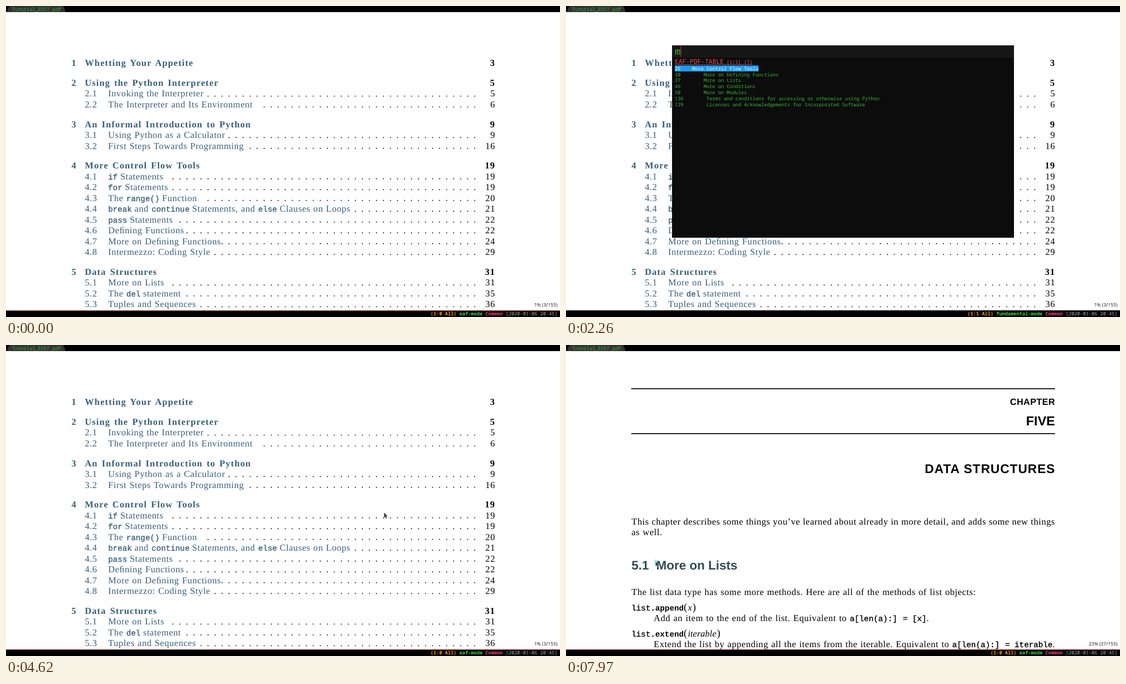
An HTML page with a canvas that plays this animation: 998x561 px, repeating every 8 s.

```html
<!DOCTYPE html>
<html lang="en">
<head>
<meta charset="utf-8">
<title>PDF viewer with fuzzy table of contents</title>
<style>
html, body { margin: 0; width: 100%; height: 100%; overflow: hidden; background: #000; }
canvas { display: block; }
</style>
</head>
<body>
<canvas id="stage" width="998" height="561"></canvas>
<script>
const W = 998, H = 561, LOOP = 8000;
const ctx = document.getElementById('stage').getContext('2d');
ctx.textRendering = 'geometricPrecision';

const LINK = '#355f7c', GREEN = '#3ab53a', RED = '#f84a4a', DARK = '#0c0c0c';
const PAGE_TOP = 11, PAGE_END = 549;
const LEFT = 117.5, DOT_STEP = 12.64, LAST_DOT = 57;

const style = (font, letter = 0, word = 0, stroke = 0) => ({ font, letter, word, stroke });
const serif = style('16.5px "Liberation Serif", serif', 0.55, 0.7);
const bold = style('bold 16.5px "Liberation Serif", serif', 1.1, 1.9);
const italic = style('italic 16.5px "Liberation Serif", serif');
const paren = style('19px "Liberation Serif", serif');
const code = style('14.25px "Liberation Mono", monospace', 0, 0, 0.35);
const codeBold = style('bold 14.25px "Liberation Mono", monospace');
const label = style('8.5px "Noto Sans", sans-serif');
const sans = (size, letter = 0) => style(`bold ${size}px "Liberation Sans", sans-serif`, letter);
const mono = (size, weight = '') => style(`${weight} ${size}px "Noto Sans Mono", monospace`);
const CELL = 5.2, ui = mono(CELL / 0.6), uiBold = mono(CELL / 0.6, 'bold');
const uiHead = mono(11.3), uiInput = mono(CELL / 0.3);

function use(s, extra = 0) {
  ctx.font = s.font;
  ctx.letterSpacing = s.letter + 'px';
  ctx.wordSpacing = s.word + extra + 'px';
}

// Draws one run and returns the x where it ends.
function put(str, x, y, s, color, align = 'left', extra = 0) {
  use(s, extra);
  ctx.textAlign = align;
  ctx.fillStyle = color;
  ctx.fillText(str, x, y);
  if (s.stroke) {
    ctx.strokeStyle = color;
    ctx.lineWidth = s.stroke;
    ctx.strokeText(str, x, y);
  }
  return x + ctx.measureText(str).width;
}

// Text with `code` parts; a right edge makes it justified.
function rich(str, x, y, color, right) {
  const runs = str.split('`').map((part, i) => i % 2 ? [part, code] : [part.replace(/fi/g, '\ufb01'), serif]);
  let extra = 0;
  if (right) {
    let width = 0;
    for (const [part, s] of runs) { use(s); width += ctx.measureText(part).width; }
    extra = (right - x - width) / (str.split(' ').length - 1);
  }
  for (const [part, s] of runs) if (part) x = put(part, x, y, s, color, 'left', extra);
}

function box(x, y, w, h, color) {
  ctx.fillStyle = color;
  ctx.fillRect(x, y, w, h);
}

function disc(x, y, r, color) {
  ctx.fillStyle = color;
  ctx.beginPath();
  ctx.arc(x, y, r, 0, 7);
  ctx.fill();
}

function shape(points, color) {
  ctx.fillStyle = color;
  ctx.beginPath();
  points.forEach(([x, y]) => ctx.lineTo(x, y));
  ctx.closePath();
  ctx.fill();
}

// chapter: title, page, entries; entry: title, page, number of leader dots
const contents = [
  ['Whetting Your Appetite', 3],
  ['Using the Python Interpreter', 5,
    ['Invoking the Interpreter', 5, 39],
    ['The Interpreter and Its Environment', 6, 31]],
  ['An Informal Introduction to Python', 9,
    ['Using Python as a Calculator', 9, 36],
    ['First Steps Towards Programming', 16, 33]],
  ['More Control Flow Tools', 19,
    ['`if` Statements', 19, 44],
    ['`for` Statements', 19, 44],
    ['The `range()` Function', 20, 39],
    ['`break` and `continue` Statements, and `else` Clauses on Loops', 21, 18],
    ['`pass` Statements', 22, 43],
    ['Defining Functions', 22, 42],
    ['More on Defining Functions', 24, 37],
    ['Intermezzo: Coding Style', 29, 38]],
  ['Data Structures', 31,
    ['More on Lists', 31, 44],
    ['The `del` statement', 35, 42],
    ['Tuples and Sequences', 36, 40]]
];

function drawContents() {
  let y = 108.3;
  contents.forEach(([title, page, ...entries], i) => {
    put(i + 1, 118, y, bold, LINK);
    put(title, 142, y, bold, LINK);
    put(page, 881.4, y, bold, '#000', 'right');
    entries.forEach(([name, at, dots], j) => {
      y += 19.5;
      put(`${i + 1}.${j + 1}`, 142, y, serif, LINK);
      rich(name, 184, y, LINK);
      for (let k = 0; k < dots; k++) {
        disc(LEFT + (LAST_DOT - k + 0.5) * DOT_STEP, y - 0.8, 0.95, '#000');
      }
      put(at, 881.2, y, serif, '#000', 'right');
    });
    y += 35.6;
  });
}

function signature(name, arg, y) {
  let x = put('list.', 118, y, code, '#000');
  x = put(name, x, y, codeBold, '#000');
  x = put('(', x, y, paren, '#000');
  x = put(arg, x + 1, y, italic, '#000');
  put(')', x + 1, y, paren, '#000');
}

function drawChapter() {
  const ink = '#000';
  box(LEFT, 78, 763.5, 1.7, ink);
  box(LEFT, 159, 763.5, 1.7, ink);
  put('CHAPTER', 881, 108, sans(16.3, 0.35), ink, 'right');
  put('FIVE', 881, 145, sans(23.5), ink, 'right');
  put('DATA STRUCTURES', 881.5, 231, sans(22.7, 1), ink, 'right');
  rich('This chapter describes some things you\u2019ve learned about already in more detail, and adds some new things', 118, 323.5, ink, 881);
  rich('as well.', 118, 343, ink);
  put('5.1', 118, 405, sans(22.5), '#2f4a57');
  put('More on Lists', 162.5, 405, sans(22.5), '#2f4a57');
  rich('The list data type has some more methods. Here are all of the methods of list objects:', 118, 451, ink);
  signature('append', 'x', 478.7);
  rich('Add an item to the end of the list. Equivalent to `a[len(a):]`  `= [x]`.', 158, 498, ink);
  signature('extend', 'iterable', 525.5);
  rich('Extend the list by appending all the items from the iterable. Equivalent to `a[len(a):]`  `= iterable`.', 158, 545, ink, 881);
}

function drawBars(mode, col, active) {
  box(0, 0, W, PAGE_TOP, '#000');
  ctx.fillStyle = '#333';
  ctx.beginPath();
  ctx.moveTo(1, PAGE_TOP);
  ctx.bezierCurveTo(4, 9, 3, 0, 8, 0);
  ctx.lineTo(101, 0);
  ctx.bezierCurveTo(106, 0, 105, 9, 108, PAGE_TOP);
  ctx.fill();
  put('Tutorial_EDIT.pdf', 11, 9, ui, '#35b435');
  box(0, PAGE_END, W, H - PAGE_END, '#000');
  if (active) box(0, PAGE_END, W, 1, '#a83a2c');
  const parts = [
    [`(1:${col} All) `, '#ff9a0a', uiBold], [mode + ' ', '#3ad84a', uiBold],
    ['Common ', '#f0407c', uiBold], ['[2020-01-06 20:45]', '#a8a8a8', ui]
  ];
  let x = 993.6 - CELL * parts.reduce((n, p) => n + p[0].length, 0);
  for (const [str, color, s] of parts) {
    put(str, x, 558.2, s, color);
    x += str.length * CELL;
  }
}

const pageLabel = str => put(str, 993.3, 541.7, label, '#222', 'right');

function heading(title, count, y) {
  const x = put(title, 196, y + 4, uiHead, RED);
  const end = put(' ' + count, x, y + 4, ui, RED);
  box(196, y + 5, end - 196, 0.8, RED);
}

function row(str, x, y, picked) {
  if (picked) box(x, y - 5.3, str.length * CELL, 10.8, '#1a9cf5');
  put(str, x, y + 3, ui, picked ? '#fff' : GREEN);
}

const icons = {
  folder: y => {
    box(196, y - 4, 4.5, 3, GREEN);
    box(196, y - 2.7, 9.6, 6.7, GREEN);
  },
  log: y => box(197, y - 4.5, 8, 9, GREEN),
  plain: y => disc(201.5, y + 1, 5.5, '#777'),
  lisp: y => disc(201.5, y + 1, 5.5, '#bd3cc4'),
  python: y => disc(201.2, y + 1.8, 4.6, '#666'),
  mark: y => {
    shape([[196, y - 5.5], [203, y - 5.5], [203, y + 5.5], [199.5, y + 2.5], [196, y + 5.5]], '#ff85c0');
    disc(199.5, y - 1.5, 1.4, '#fff');
  },
  note: y => box(196, y - 4, 11, 7.6, '#8ed4ee'),
  pdf: y => box(196.5, y - 4.5, 7.5, 8.6, '#a82222'),
  file: y => {
    ctx.strokeStyle = '#aaa';
    ctx.lineWidth = 0.9;
    ctx.beginPath();
    [[196.5, -4.5], [201.5, -4.5], [204.8, -1.2], [204.8, 4.8], [196.5, 4.8], [196.5, -4.5]]
      .forEach(([x, d]) => ctx.lineTo(x, y + d));
    ctx.moveTo(201.5, y - 4.5);
    ctx.lineTo(201.5, y - 1.2);
    ctx.lineTo(204.8, y - 1.2);
    ctx.stroke();
  }
};

const home = '/home/toby/', ext = home + 'lazycat-emacs/site-lisp/extensions/';
const snails = ext + 'snails/snails', eaf = ext + 'emacs-application-framework/';
const files = [
  ['folder', 'Books', 182, 210.5], ['log', '*Messages*', 194, 210.5], ['plain', '*eaf*', 207, 212],
  ['mark', home + '.emacs.d/bookmarks', 245, 208.5],
  ['note', home + 'snails/README.md', 257, 211.5],
  ['lisp', snails + '-core.el', 270, 212],
  ['pdf', home + 'Books/Tutorial_EDIT.pdf', 283, 209.5],
  ['lisp', eaf + 'eaf.el', 296, 212],
  ['file', home + '.emacs.d/eaf/pdf-viewer/table/95d29e6bdbf68b821593ca9702bac3d2', 309, 211],
  ['lisp', snails + '-backend-rg.el', 322, 212],
  ['lisp', snails + '-backend-fd.el', 336, 212],
  ['python', eaf + 'app/pdf-viewer/buffer.py', 349, 212],
  ['lisp', snails + '-backend-projectile.el', 364, 212],
  ['lisp', snails + '-backend-directory-files.el', 378, 212],
  ['lisp', snails + '.el', 392, 212],
  ['python', eaf + 'core/buffer.py', 405, 212],
  ['lisp', snails + '-backend-awesome-tab-group.el', 419.5, 212]
];

function drawHome() {
  heading('AWESOME TAB GROUP', '[1/6] (3)', 100);
  ['Emacs', 'Common', 'Dired'].forEach((s, i) => row(s, 196, 112.6 + i * 10.8, i === 0));
  heading('BUFFER', '[2/6] (4)', 158);
  row('eaf-mode Tutorial_EDIT.pdf', 196, 170);
  heading('RECENTF', '[3/6] (20)', 232);
  for (const [icon, str, y, x] of files) {
    icons[icon](y);
    row(str, x, y);
  }
}

const hits = [
  '25    More Control Flow Tools', '30        More on Defining Functions', '37        More on Lists',
  '46        More on Conditions', '50        More on Modules',
  '136        Terms and conditions for accessing or otherwise using Python',
  '139        Licenses and Acknowledgements for Incorporated Software'
];

function drawHits(list) {
  heading('EAF-PDF-TABLE', `[1/1] (${list.length})`, 100);
  list.forEach((s, i) => row(s, 196, 112.6 + i * 10.9, i === 0));
}

// Each key press: time and length of the query so far.
const QUERY = 'more on list';
const keys = [[2140, 1], [2270, 2], [2400, 3], [2540, 4], [2770, 5], [2820, 6], [2870, 7],
  [3340, 8], [3410, 9], [3480, 10], [3550, 11], [3620, 12]];
const typed = t => keys.reduce((n, [at, len]) => t >= at ? len : n, 0);

function drawPopup(t, n) {
  ctx.save();
  ctx.beginPath();
  ctx.rect(191, 71, 616, 347);
  ctx.clip();
  const fade = t < 870 ? 0.1 : t < 930 ? 0.235 : t < 990 ? 0.6 : 1;
  ctx.globalAlpha = fade;
  box(191, 71, 616, 347, DARK);
  if (t >= 1140) {
    box(191, 71, 616, 22, '#171717');
    put(QUERY.slice(0, n), 196, 87.7, uiInput, GREEN);
    box(196 + n * CELL * 2, 72, 1.2, 19.5, '#d8222c');
    if (t < 2210) drawHome();
    else drawHits(t < 3680 ? hits : [hits[2]]);
  }
  if (t < 2140) {
    ctx.globalAlpha = fade < 1 ? 0.4 : 1;
    box(681, 297.5, 1, 10, '#ddd');
    for (const y of [297, 307]) {
      box(679, y, 2, 1, '#ddd');
      box(682, y, 2, 1, '#ddd');
    }
  }
  ctx.restore();
}

// start, end, target of each pointer move
const moves = [[6110, 6500, 351.8, 385], [6680, 6780, 318, 400], [7250, 7790, 161.5, 390]];

function pointer(t) {
  let x = 681, y = 302.5;
  for (const [from, to, tx, ty] of moves) {
    const p = Math.min(1, Math.max(0, (t - from) / (to - from)));
    const e = p * p * (3 - 2 * p);
    x += (tx - x) * e;
    y += (ty - y) * e;
  }
  return [x, y];
}

function drawPointer(t) {
  const [x, y] = pointer(t);
  const arrow = [[0, 0], [0, 9], [2, 7.2], [3.6, 10.4], [5, 9.7], [3.6, 6.6], [6.3, 6.3]]
    .map(([a, b]) => [x + a, y + b]);
  shape(arrow, '#444');
  ctx.lineWidth = 0.8;
  ctx.strokeStyle = 'rgba(225,225,225,.8)';
  ctx.stroke();
  shape(arrow, '#444');
  if (t >= 7970) {
    const glow = ctx.createRadialGradient(x, y, 0, x, y, 4.5);
    glow.addColorStop(0, 'rgba(90,225,245,.85)');
    glow.addColorStop(0.6, 'rgba(130,235,250,.5)');
    glow.addColorStop(1, 'rgba(160,245,255,0)');
    disc(x, y, 4.5, glow);
  }
}

function draw(t) {
  const popup = t >= 810 && t < 4620;
  const blank = t >= 4680 && t < 5540;
  const searching = t >= 600 && t < 4620;
  const n = typed(t);
  box(0, 0, W, H, '#fff');
  if (t < 4680) drawContents();
  else if (t >= 5680) drawChapter();
  if (blank) box(0, PAGE_TOP, W, PAGE_END - PAGE_TOP, DARK);
  else pageLabel(t < 4680 ? '1% (3/155)' : '23% (37/155)');
  if (popup) drawPopup(t, n);
  drawBars(searching ? 'fundamental-mode' : 'eaf-mode', searching ? n : 0, t < 1140 || t >= 4620);
  if (t >= 4620) drawPointer(t);
}

let start;
function tick(now) {
  start ??= now;
  draw((now - start) % LOOP);
  requestAnimationFrame(tick);
}
draw(0);
requestAnimationFrame(tick);
</script>
</body>
</html>
```
